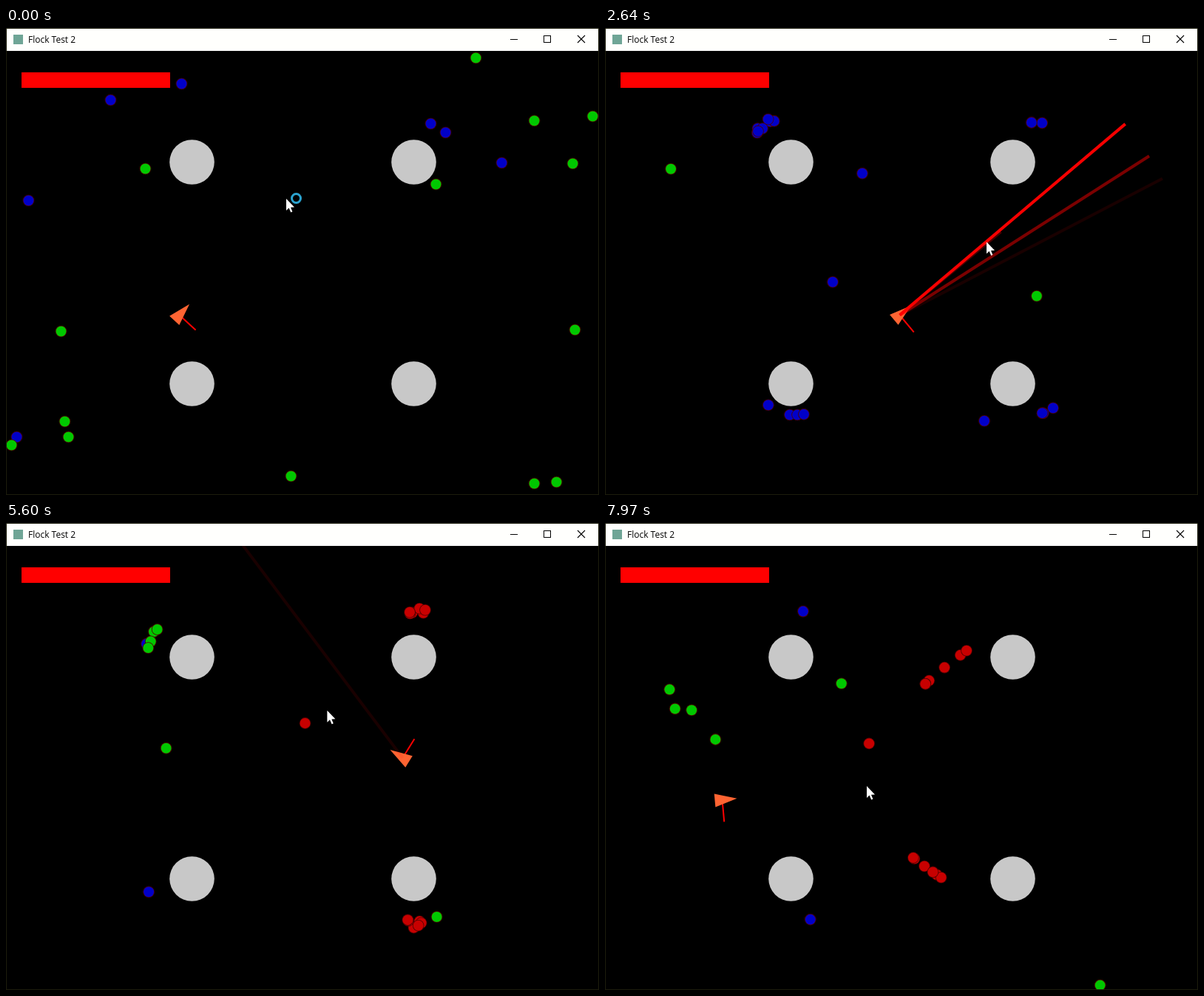
Recreate the animation shown at these times as an HTML page with a canvas. Size 802 by 632 pixels, loop 8000 ms.

```html
<!DOCTYPE html>
<html lang="en">
<head>
<meta charset="utf-8">
<title>Flock Test 2</title>
<style>
html, body { margin: 0; width: 100%; height: 100%; overflow: hidden; background: #000; }
canvas { display: block; }
</style>
</head>
<body>
<canvas id="stage" width="802" height="632"></canvas>
<script>
const ctx = document.getElementById('stage').getContext('2d');
const WIDTH = 802, HEIGHT = 632, BAR = 31;
const FPS = 30, STEPS = 240, LOOP = 8000, TAU = Math.PI * 2;
const RUN = 137 / FPS, STROLL = 60 / FPS;   // pixels per step
const CALM = 168, CHARGE = 197;             // steps at which the hiding ends and the attack starts
const FADE = 31, REACH = 400;               // laser life in steps, and its range
const COLORS = { wander: '#00c800', hide: '#0000c8', attack: '#c80000' };
const PILLARS = { 1: [251, 181], 2: [551, 181], 3: [251, 481], 4: [551, 481] };

// Start point and the pillars to hide behind, in turn; no pillar means always wandering.
const HIDERS = [
  [237, 75, '1'], [141, 97, '1'], [30, 233, '2'], [14, 553, '2'],
  [574, 129, '2'], [594, 141, '1'], [670, 182, '2']
];
const WANDERERS = [
  [188, 190, '12'], [74, 410, '34'], [79, 532, '34'], [84, 553, '34'], [7, 564, '3'],
  [385, 606, '32'], [635, 40, '1'], [793, 119, '1'], [714, 125, '12'], [581, 211, ''],
  [766, 183, ''], [769, 408, '4'], [744, 614, '4'], [714, 616, '4']
];

// step, x, y
const SHIP_PATH = [
  [0, 234, 388], [36, 399, 388], [79, 398, 388], [108, 536, 318],
  [183, 536, 317], [192, 483, 319], [239, 158, 374]
];
// step, x, y and, where the mouse fires, how far the laser gets
const MOUSE_PATH = [
  [0, 379, 231], [36, 552, 223], [51, 560, 304, REACH], [57, 540, 271, 177], [63, 555, 288, REACH],
  [78, 516, 288, REACH], [80, 516, 291], [108, 356, 387], [127, 420, 330, 98], [133, 420, 273, 151],
  [140, 480, 243, REACH], [144, 487, 251], [170, 430, 254, 315], [177, 455, 219, REACH],
  [184, 495, 204, 140], [192, 516, 185], [239, 354, 356]
];

let seed = 7;
const random = () => (seed = seed * 16807 % 2147483647) / 2147483647;
const between = (a, b) => a + (b - a) * random();
const mix = (a, b, p) => a + (b - a) * p;

function along(path, step) {
  const i = Math.max(1, path.findIndex(k => k[0] >= step));
  const [s0, x0, y0] = path[i - 1], [s1, x1, y1] = path[i];
  const p = (step - s0) / (s1 - s0);
  return [mix(x0, x1, p), mix(y0, y1, p)];
}

function makeAgent([x, y, route], wake) {
  return {
    x, y, route, wake,
    heading: between(0, TAU),
    leave: between(52, 80),
    // agents heading for the far west side are shot and come back mirrored
    shot: x > WIDTH / 2 && '13'.includes(route[0] || '-') ? Math.round(between(15, 32)) : -1,
    timid: random() < 0.4,
    spread: between(-0.28, 0.28),
    gap: between(56, 67)
  };
}

function mood({ route, wake, timid }, step) {
  if (!route || step < wake) return 'wander';
  if (step < CALM) return 'hide';
  if (PILLARS[route.at(-1)][0] > WIDTH / 2) return 'attack';
  return timid ? 'hide' : 'wander';
}

// The spot on the far side of the pillar, seen from the ship.
function hidingSpot(agent, step, [sx, sy]) {
  const [px, py] = PILLARS[step < agent.leave ? agent.route[0] : agent.route.at(-1)];
  const angle = Math.atan2(py - sy, px - sx) + agent.spread;
  return [px + agent.gap * Math.cos(angle), py + agent.gap * Math.sin(angle)];
}

function advance(agent, step, ship) {
  const state = mood(agent, step);
  let speed = STROLL;
  if (step === agent.shot) agent.x = WIDTH - agent.x;
  if (state === 'wander') {
    agent.heading += between(-0.2, 0.2);
  } else {
    const charging = state === 'attack' && step >= CHARGE;
    const [gx, gy] = charging ? ship : hidingSpot(agent, step, ship);
    agent.heading = Math.atan2(gy - agent.y, gx - agent.x);
    speed = Math.min(RUN, Math.hypot(gx - agent.x, gy - agent.y));
  }
  agent.x = (agent.x + speed * Math.cos(agent.heading) + WIDTH) % WIDTH;
  agent.y += speed * Math.sin(agent.heading);
  if (agent.y < BAR || agent.y > HEIGHT) agent.heading *= -1;
  for (const [px, py] of Object.values(PILLARS)) {
    const dx = agent.x - px, dy = agent.y - py, push = 42 / Math.hypot(dx, dy);
    if (push > 1) {
      agent.x = px + dx * push;
      agent.y = py + dy * push;
    }
  }
}

function simulate() {
  const crowd = [
    ...HIDERS.map(a => makeAgent(a, 0)),
    ...WANDERERS.map(a => makeAgent(a, between(12, 48)))
  ];
  return Array.from({ length: STEPS }, (_, step) => {
    const ship = along(SHIP_PATH, step);
    const moment = crowd.map(a => ({ x: a.x, y: a.y, state: mood(a, step) }));
    crowd.forEach(a => advance(a, step, ship));
    return moment;
  });
}

function disc(x, y, r, fill) {
  ctx.beginPath();
  ctx.arc(x, y, r, 0, TAU);
  ctx.fillStyle = fill;
  ctx.fill();
}

function line(x0, y0, x1, y1, color, width) {
  ctx.beginPath();
  ctx.moveTo(x0, y0);
  ctx.lineTo(x1, y1);
  ctx.strokeStyle = color;
  ctx.lineWidth = width;
  ctx.stroke();
}

function polygon(points, fill) {
  ctx.beginPath();
  points.forEach(([x, y]) => ctx.lineTo(x, y));
  ctx.closePath();
  ctx.fillStyle = fill;
  ctx.fill();
}

function drawAgent({ x, y, state }) {
  disc(x, y, 7.8, '#500000');
  disc(x, y, 7, COLORS[state]);
}

function drawShip([x, y], [mx, my]) {
  ctx.save();
  ctx.translate(x, y);
  ctx.rotate(Math.atan2(my - y, mx - x));
  line(0, 0, 0, 30, '#ff0000', 2);
  polygon([[20, 0], [-10, 9], [-10, -9]], '#ff6432');
  ctx.restore();
}

function drawLaser([fired, mx, my, reach], step) {
  const age = step - fired;
  if (!reach || age < 0 || age >= FADE) return;
  const [x, y] = along(SHIP_PATH, fired);
  const angle = Math.atan2(my - y, mx - x);
  const color = `rgba(255,0,0,${1 - age / FADE})`;
  line(x, y, x + reach * Math.cos(angle), y + reach * Math.sin(angle), color, 4);
}

function drawWindow() {
  ctx.fillStyle = '#fffffd';
  ctx.fillRect(0, 0, WIDTH, BAR);
  ctx.fillStyle = '#6fa596';
  ctx.fillRect(10, 9, 13, 13);
  ctx.fillStyle = '#000';
  ctx.font = '12px "Open Sans", "Noto Sans", sans-serif';
  ctx.fillText('Flock Test 2', 30, 20);
  line(682, 15.5, 692, 15.5, '#000', 1);
  ctx.strokeRect(727.5, 10.5, 9, 9);
  line(773, 10, 783, 20, '#000', 1.1);
  line(783, 10, 773, 20, '#000', 1.1);
  ctx.strokeStyle = '#1c1c0c';
  ctx.lineWidth = 1;
  ctx.strokeRect(0.5, 0.5, WIDTH - 1, HEIGHT - 1);
}

function drawCursor([x, y], step) {
  ctx.save();
  ctx.translate(x, y);
  polygon([[0, 0], [0, 16], [3.6, 12.6], [6.2, 18.4], [8.4, 17.4], [6, 11.8], [11, 11.4]], '#fff');
  if (step < 54) {
    ctx.beginPath();
    ctx.arc(13.5, -0.5, 6, 0, TAU);
    ctx.strokeStyle = '#2ba3cf';
    ctx.lineWidth = 3;
    ctx.stroke();
  }
  ctx.restore();
}

const moments = simulate();

function draw(step) {
  const mouse = along(MOUSE_PATH, step);
  ctx.fillStyle = '#000';
  ctx.fillRect(0, 0, WIDTH, HEIGHT);
  ctx.save();
  ctx.translate(0.5, 0.5);
  Object.values(PILLARS).forEach(([x, y]) => disc(x, y, 30.3, '#c8c8c8'));
  moments[step].forEach(drawAgent);
  drawShip(along(SHIP_PATH, step), mouse);
  MOUSE_PATH.forEach(point => drawLaser(point, step));
  ctx.restore();
  ctx.fillStyle = '#f00';
  ctx.fillRect(21, 60, 201, 21);
  drawWindow();
  drawCursor(mouse, step);
}

const start = performance.now();
function tick() {
  const time = Math.max(0, performance.now() - start) % LOOP;
  draw(Math.min(STEPS - 1, Math.floor(time * FPS / 1000 + 0.001)));
  requestAnimationFrame(tick);
}
tick();
</script>
</body>
</html>
```
